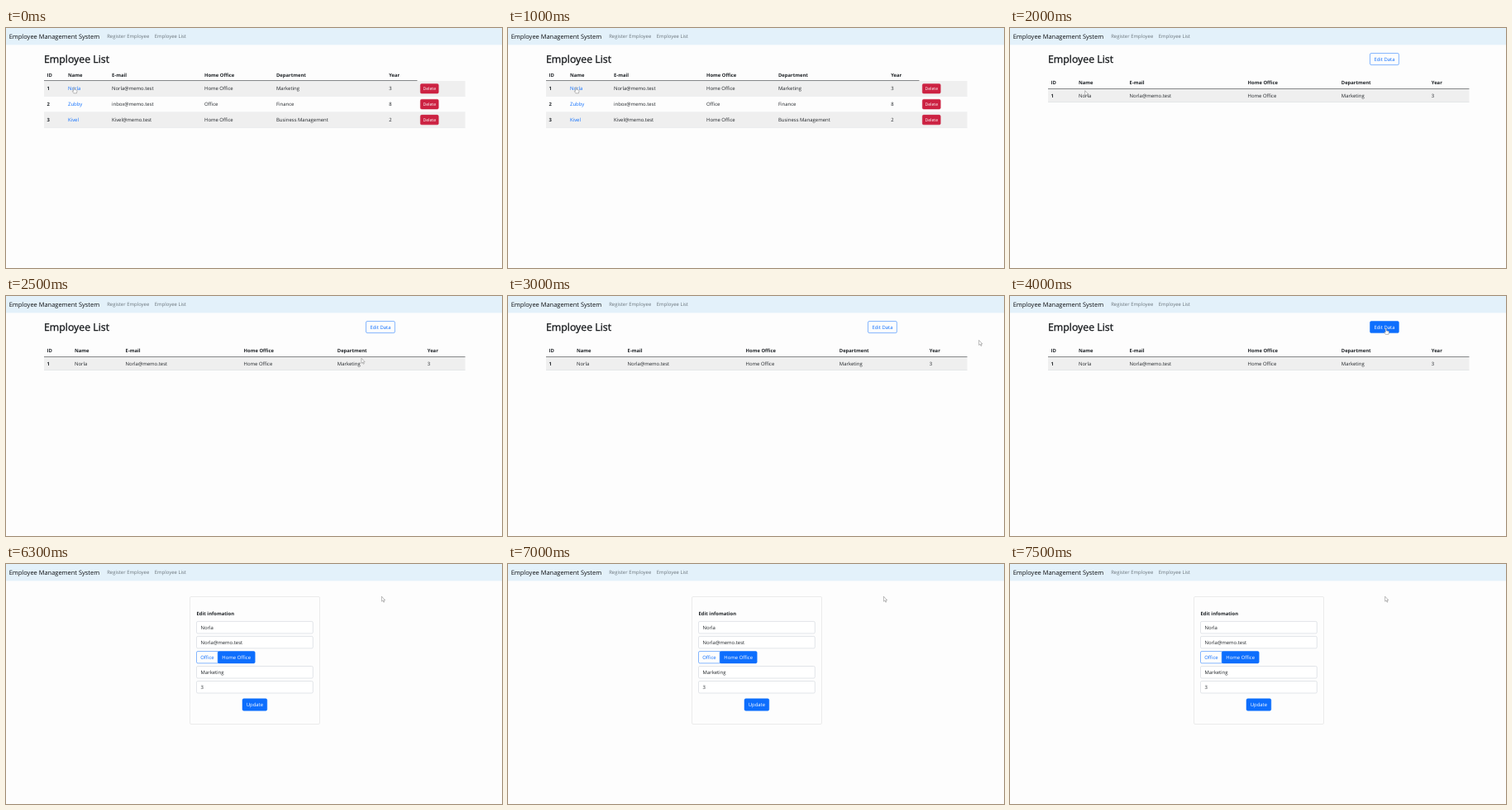
Recreate the animation shown at these times as an HTML page. Size 600 px wide and 290 px high, loop 8000 ms.

```html
<!DOCTYPE html>
<html lang="en">
<head>
<meta charset="utf-8">
<title>Employee Management System</title>
<style>
  html, body { margin: 0; width: 100%; height: 100%; overflow: hidden; background: #fdfdfd; }
  svg { display: block; width: 600px; height: 290px; }
  text {
    font-family: "Open Sans", "Noto Sans", sans-serif;
    font-size: 5.94px;
    fill: #212529;
    text-rendering: geometricPrecision;
    white-space: pre;
  }
  .brand { font-size: 7.47px; fill: #0c0e10; }
  .nav { fill: #6b757c; }
  .title { font-size: 12.3px; fill: #15181b; stroke: #15181b; stroke-width: 0.32px; }
  .bold { font-size: 5.87px; font-weight: 700; }
  .link { fill: #0d6efd; }
  .small { font-size: 5.2px; }
  .white { fill: #fff; }
  .mid { text-anchor: middle; }
</style>
</head>
<body>
<svg id="stage" viewBox="0 0 600 290" xmlns="http://www.w3.org/2000/svg"></svg>
<script>
const LOOP = 8000;
const STEP = 100;
const BLUE = "#0d6efd";
const RED = "#cc2242";
const RULE = "#858789";
const stage = document.getElementById("stage");

function add(parent, tag, attrs, content) {
  const node = document.createElementNS("http://www.w3.org/2000/svg", tag);
  for (const key in attrs) node.setAttribute(key, attrs[key]);
  if (content !== undefined) node.textContent = content;
  return parent.appendChild(node);
}
const group = () => add(stage, "g", {});
const label = (g, x, y, content, cls = "") => add(g, "text", { x, y, class: cls }, content);
const box = (g, x, y, width, height, fill, extra = {}) =>
  add(g, "rect", { x, y, width, height, fill, ...extra });

function button(g, x, y, w, h, name, color, cls = "", filled = true) {
  const frame = box(g, x, y, w, h, filled ? color : "#fdfdfd", { rx: 1.6, stroke: color, "stroke-width": 0.5 });
  const drop = cls === "small" ? 1.9 : 2.15;
  const caption = label(g, x + w / 2, y + h / 2 + drop, name, `mid ${cls} ${filled ? "white" : "link"}`);
  return { frame, caption };
}

const HEADERS = ["ID", "Name", "E-mail", "Home Office", "Department", "Year"];
const STAFF = [
  ["1", "Norla", "Norla@memo.test", "Home Office", "Marketing", "3"],
  ["2", "Zubby", "inbox@memo.test", "Office", "Finance", "8"],
  ["3", "Kivel", "Kivel@memo.test", "Home Office", "Business Management", "2"]
];

function cells(g, columns, y, values, classOf) {
  values.forEach((value, i) => label(g, columns[i], y, value, classOf(i)));
}

function navbar() {
  const g = group();
  box(g, 0, 0, 600, 20.4, "#e3f1fa");
  label(g, 3.7, 12.7, "Employee Management System", "brand");
  label(g, 122.2, 12.2, "Register Employee", "nav");
  label(g, 179.8, 12.2, "Employee List", "nav");
}

function listPage() {
  const g = group();
  const columns = [49.5, 75, 128, 240, 327, 463.2];
  label(g, 46, 42.4, "Employee List", "title");
  cells(g, columns, 58.7, HEADERS, () => "bold");
  STAFF.forEach((person, i) => {
    const top = 64 + i * 18.85;
    box(g, 46, top, 509.5, 18.85, i % 2 ? "#fdfdfd" : "#efefef");
    box(g, 46, top + 18.5, 509.5, 0.4, "#dee2e6");
    cells(g, columns, top + 10.8, person, c => c === 0 ? "bold" : c === 1 ? "link" : "");
    button(g, 501.3, top + 3.4, 21.9, 11.7, "Delete", RED, "small");
  });
  box(g, 46, 63, 451.5, 1, RULE);
  return g;
}

function detailPage() {
  const g = group();
  const columns = [49.5, 83, 144.6, 287.6, 400.8, 509.8];
  label(g, 46, 42.4, "Employee List", "title");
  const edit = button(g, 435.5, 30.5, 34.9, 14.1, "Edit Data", BLUE, "", false);
  cells(g, columns, 67.9, HEADERS, () => "bold");
  box(g, 46, 73.6, 509.5, 16.2, "#efefef");
  box(g, 46, 89.5, 509.5, 0.5, "#d9dcdf");
  box(g, 46, 73, 509.5, 1, RULE);
  cells(g, columns, 84.2, STAFF[0], c => c ? "" : "bold");
  return { g, edit };
}

function editPage() {
  const g = group();
  const [, name, mail, , department, year] = STAFF[0];
  box(g, 222.5, 39.5, 157, 154, "none", { rx: 1.5, stroke: "#dfdfdf", "stroke-width": 0.6 });
  label(g, 230.5, 61.7, "Edit infomation", "bold");
  [[69.4, name], [87.4, mail], [123.5, department], [141.5, year]].forEach(([y, value]) => {
    box(g, 230.5, y, 140.8, 14.5, "#fff", { rx: 1.6, stroke: "#ced4da", "stroke-width": 0.6 });
    label(g, 235.6, y + 9.6, value);
  });
  button(g, 230.5, 105.5, 27, 14.4, "", BLUE, "", false);
  label(g, 243.4, 115.1, "Office", "mid link");
  button(g, 256.2, 105.5, 45, 14.4, "Home Office", BLUE);
  button(g, 286, 162.8, 29.8, 14.4, "Update", BLUE);
  return g;
}

function cursors() {
  const ink = { fill: "#fff", stroke: "#777", "stroke-width": 0.5, "stroke-linejoin": "round" };
  const arrow = add(stage, "path", {
    d: "M0 0V6L1.4 4.8L2.4 7L3.3 6.6L2.4 4.5H4.2Z", ...ink
  });
  const hand = add(stage, "path", {
    d: "M-.6 .5Q0 -.3 .6 .5V3L3.2 3.6Q3.8 3.8 3.7 4.6L3.1 7.4H-.4L-2.1 4.9Q-1.9 4.1 -.6 5Z", ...ink
  });
  return { arrow, hand };
}

navbar();
const list = listPage();
const detail = detailPage();
const form = editPage();
const { arrow, hand } = cursors();

const hold = () => 0;
const linear = u => u;
const smooth = u => u * u * (3 - 2 * u);
const slowing = u => 1 - (1 - u) ** 2;

// Pointer path: time, x, y, easing towards the next point
const PATH = [
  [0, 82.3, 71.4, hold],
  [2000, 90.7, 75.7, smooth],
  [2800, 587, 75, linear],
  [2900, 583, 65, linear],
  [3000, 569.7, 53.4, slowing],
  [3700, 454.8, 39, hold],
  [6300, 454.4, 39.2, hold],
  [7500, 453.7, 39.2, hold],
  [LOOP, 453.7, 39.2, hold]
];

function pointerAt(t) {
  const next = PATH.findIndex(([time]) => t < time);
  const [t0, x0, y0, ease] = PATH[next - 1];
  const [t1, x1, y1] = PATH[next];
  const u = ease((t - t0) / (t1 - t0));
  return [x0 + (x1 - x0) * u, y0 + (y1 - y0) * u];
}

const show = (node, on) => node.setAttribute("display", on ? "inline" : "none");

function render(time) {
  const t = Math.floor((time % LOOP) / STEP) * STEP;
  const onList = t < 2000;
  const onForm = t >= 6300;
  const onDetail = !onList && !onForm;
  const [x, y] = pointerAt(t);
  const hover = onDetail && x > 435 && x < 471 && y > 30 && y < 45;

  show(list, onList);
  show(detail.g, onDetail);
  show(form, onForm);
  detail.edit.frame.setAttribute("fill", hover ? BLUE : "#fdfdfd");
  detail.edit.caption.setAttribute("class", hover ? "mid white" : "mid link");

  const pointing = onList || hover;
  show(hand, pointing);
  show(arrow, !pointing);
  (pointing ? hand : arrow).setAttribute("transform", `translate(${x} ${y})`);
}

const start = performance.now();
function tick() {
  render(performance.now() - start);
  requestAnimationFrame(tick);
}
tick();
</script>
</body>
</html>
```
